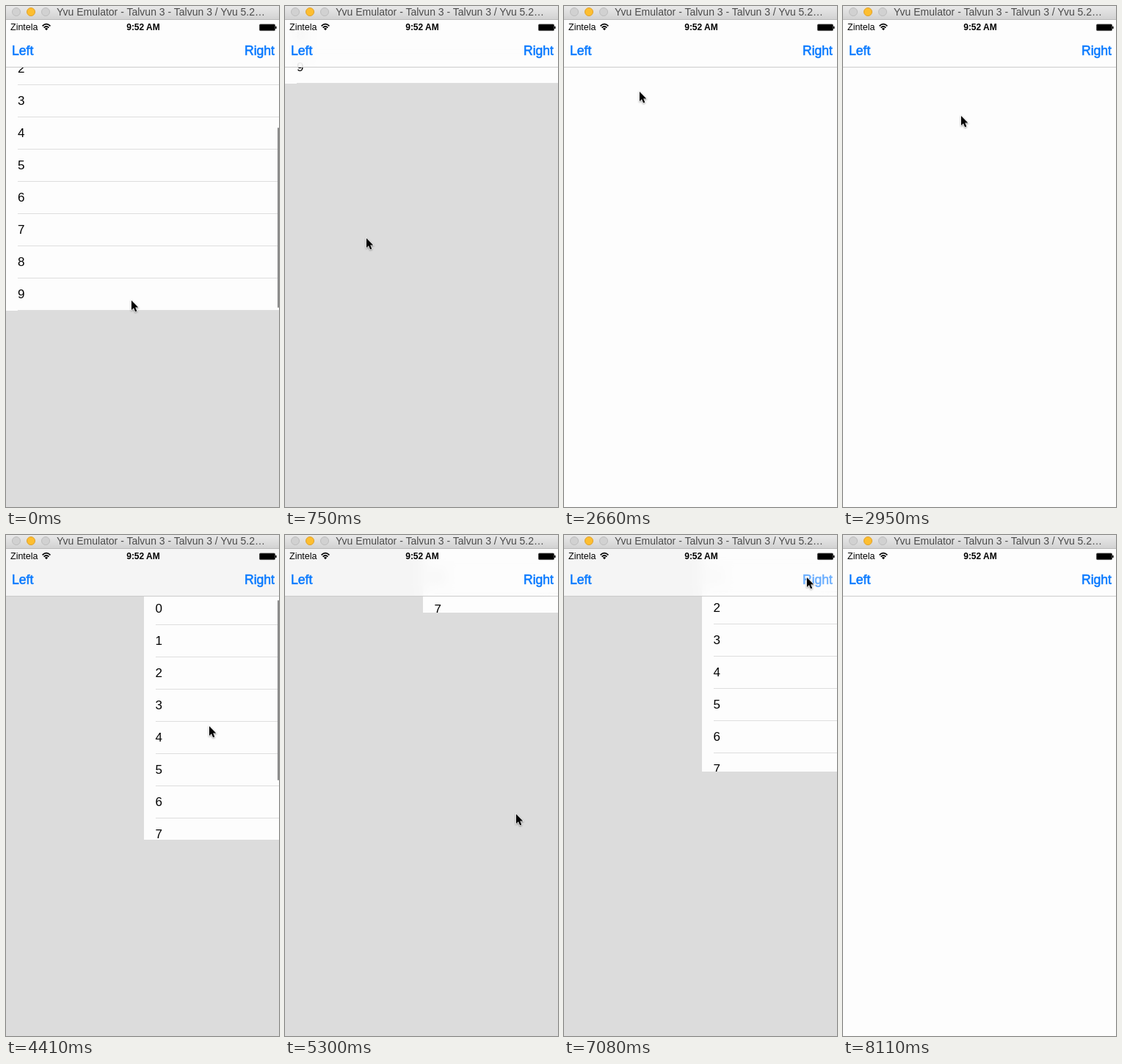
An HTML page that plays this animation: 372x684 px, repeating every 8360 ms.

```html
<!DOCTYPE html>
<html lang="en">
<head>
<meta charset="utf-8">
<title>Drop-down menus</title>
<style>
html, body { margin: 0; width: 100%; height: 100%; overflow: hidden; }
body { position: relative; background: #fdfdfd; color: #000; font-family: "Liberation Sans", Arial, sans-serif; }
body * { position: absolute; box-sizing: border-box; white-space: nowrap; }
#stage { left: 0; top: 0; width: 372px; height: 684px; overflow: hidden; background: #fdfdfd; }
#dim { left: 0; right: 0; top: 19px; bottom: 0; background: #dcdcdc; }
.panel { top: 83px; right: 0; height: 333px; overflow: hidden; background: #fdfdfd; }
#leftPanel { left: 0; }
#rightPanel { left: 187.5px; }
.list { left: 16px; right: 0; top: 0; }
.row { left: 0; right: 0; height: 44px; line-height: 44px; font-size: 17px; border-bottom: 1px solid #dedede; }
.thumb { right: 0; top: 3px; width: 2.5px; height: 246px; border-radius: 2px; background: #8c8c8c; }
#bar { left: 0; top: 19px; width: 372px; height: 65px; background: rgba(253,253,253,.76); backdrop-filter: blur(10px); border-bottom: 1px solid #cbcbcb; }
.button { top: 32px; line-height: 20px; font-size: 17.6px; color: #0a7aff; -webkit-text-stroke: .6px #0a7aff; }
#leftButton { left: 8px; }
#rightButton { right: 6px; }
#network { left: 6px; top: 3px; font-size: 12.5px; line-height: 15px; }
#clock { left: 0; width: 374px; top: 3px; text-align: center; font: bold 12px/15px "Liberation Sans", Arial, sans-serif; }
#title { left: 0; top: 0; width: 372px; height: 19px; background: linear-gradient(#e9e9e9, #d2d2d2); border-bottom: 1px solid #b9b9b9; }
#title span { left: 69px; top: 0; font-size: 14px; line-height: 17px; color: #4b4b4b; }
.light { top: 2px; width: 12px; height: 12px; border-radius: 50%; background: #d1d1d1; border: 1px solid #bdbdbd; }
.light.on { background: #fdbe30; border-color: #e0a12c; }
svg { left: 0; top: 0; overflow: visible; }
#cursor { filter: drop-shadow(0 1px 1px rgba(0,0,0,.4)); }
</style>
</head>
<body>
<div id="stage">
  <div id="dim"></div>
  <div class="panel" id="leftPanel"><div class="list"></div><div class="thumb"></div></div>
  <div class="panel" id="rightPanel"><div class="list"></div><div class="thumb"></div></div>
  <div id="bar">
    <span id="network">Zintela</span>
    <span id="clock">9:52 AM</span>
    <span class="button" id="leftButton">Left</span>
    <span class="button" id="rightButton">Right</span>
    <svg width="372" height="20">
      <g fill="none" stroke="#000" stroke-width="1.7">
        <path d="M49.6 8.4Q55 3 60.4 8.4M51.6 10.7Q55 7.3 58.4 10.7"/>
        <path d="M55 14.2L52.9 12Q55 10.2 57.1 12Z" fill="#000" stroke="none"/>
      </g>
      <rect x="345.5" y="6" width="21" height="8.6" rx="1.2" fill="#000" stroke="#444" stroke-width=".8"/>
      <rect x="367" y="8.6" width="1.6" height="3.6" rx=".8"/>
    </svg>
  </div>
  <div id="title">
    <i class="light" style="left:8px"></i>
    <i class="light on" style="left:28px"></i>
    <i class="light" style="left:48px"></i>
    <span>Yvu Emulator - Talvun 3 - Talvun 3 / Yvu 5.2…</span>
  </div>
  <svg id="cursor" width="12" height="19">
    <path d="M0 0V13L3 10.3L5.1 15.3L7.3 14.4L5.2 9.5H9.3Z" fill="#000" stroke="#fff" stroke-width="1.2" paint-order="stroke"/>
  </svg>
</div>
<script>
const LOOP = 8360, HOLD_FROM = 6190, HOLD_TO = 6790, LAST = 52;
const $ = id => document.getElementById(id);

// All timings below are in animation steps of about 147 ms.
const EVENTS = [
  { at: -9, side: 'left', open: true },
  { at: 2, side: 'left', open: false },
  { at: 9, side: 'left', open: true, button: true },
  { at: 13, side: 'left', open: false, button: true },
  { at: 23, side: 'right', open: true, button: true },
  { at: 33, side: 'right', open: false },
  { at: 39, side: 'right', open: true, button: true },
  { at: 43, side: 'right', open: false, button: true }
];
const OPENING = [0, .55, .949, 1];
const CLOSING = [1, .72, .35, .069, 0];
const DIM_IN = [0, 1];
const DIM_OUT = [1, 1, 1, 1, .4, 0];
const PRESS = [.4, .6, .87, 1];

const CURSOR = [
  [0, 171, 402], [2, 170, 470], [4, 140, 400], [8, 23, 69], [14, 23, 69], [16, 45, 84],
  [20, 161, 150], [23, 333, 60], [24, 333, 60], [26, 277, 265], [28, 277, 235], [30, 277, 261],
  [33, 292, 475], [34, 297, 470], [36, 315, 381], [39, 331, 58], [44, 331, 58],
  [47, 318, 170], [50, 277, 468], [51, 356, 658], [52, 380, 720]
];
const SCROLL = {
  left: [[0, 107]],
  right: [[26, 0], [28, 30], [29, 13], [30, 4], [36, 1.5], [37, 0]]
};
const THUMB = {
  left: [[0, 1], [1, 1], [3, 0]],
  right: [[26, 0], [27, 1], [31, 1], [33, 0]]
};

const pick = (list, i) => list[Math.min(i, list.length - 1)];

function track(keys, k, col = 1) {
  const i = keys.findIndex(key => key[0] > k);
  if (i === 0) return keys[0][col];
  if (i < 0) return keys[keys.length - 1][col];
  const a = keys[i - 1], b = keys[i];
  return a[col] + (b[col] - a[col]) * (k - a[0]) / (b[0] - a[0]);
}

function stepAt(t) {
  if (t >= HOLD_TO) return Math.min(LAST, 43 + Math.floor((t - HOLD_TO) / 146));
  return Math.min(42, Math.floor(Math.min(t, HOLD_FROM) / 147));
}

for (const list of document.querySelectorAll('.list')) {
  for (let n = 0; n < 10; n++) {
    const row = document.createElement('div');
    row.className = 'row';
    row.style.top = n * 44 + 'px';
    row.textContent = n;
    list.append(row);
  }
}

function draw(k) {
  const now = EVENTS.filter(e => e.at <= k).pop();
  const age = k - now.at;

  $('dim').style.opacity = pick(now.open ? DIM_IN : DIM_OUT, age);
  // The bar stays white until the menu is opened again.
  $('dim').style.top = (k < 9 ? 84 : 19) + 'px';

  for (const side of ['left', 'right']) {
    const active = side === now.side;
    const panel = $(side + 'Panel');
    const shown = active ? pick(now.open ? OPENING : CLOSING, age) : 0;
    const scroll = track(SCROLL[side], k);
    const [list, thumb] = panel.children;
    panel.style.visibility = shown ? 'visible' : 'hidden';
    panel.style.top = 83 - Math.round((1 - shown) * 333) + 'px';
    list.style.top = -scroll + 'px';
    thumb.style.top = 3 + scroll * .75 + 'px';
    thumb.style.opacity = track(THUMB[side], k);
    $(side + 'Button').style.opacity = active && now.button ? pick(PRESS, age) : 1;
  }

  $('cursor').style.left = track(CURSOR, k, 1) + 'px';
  $('cursor').style.top = track(CURSOR, k, 2) + 'px';
}

const start = performance.now();
function tick() {
  draw(stepAt((performance.now() - start) % LOOP));
  requestAnimationFrame(tick);
}
tick();
</script>
</body>
</html>
```
